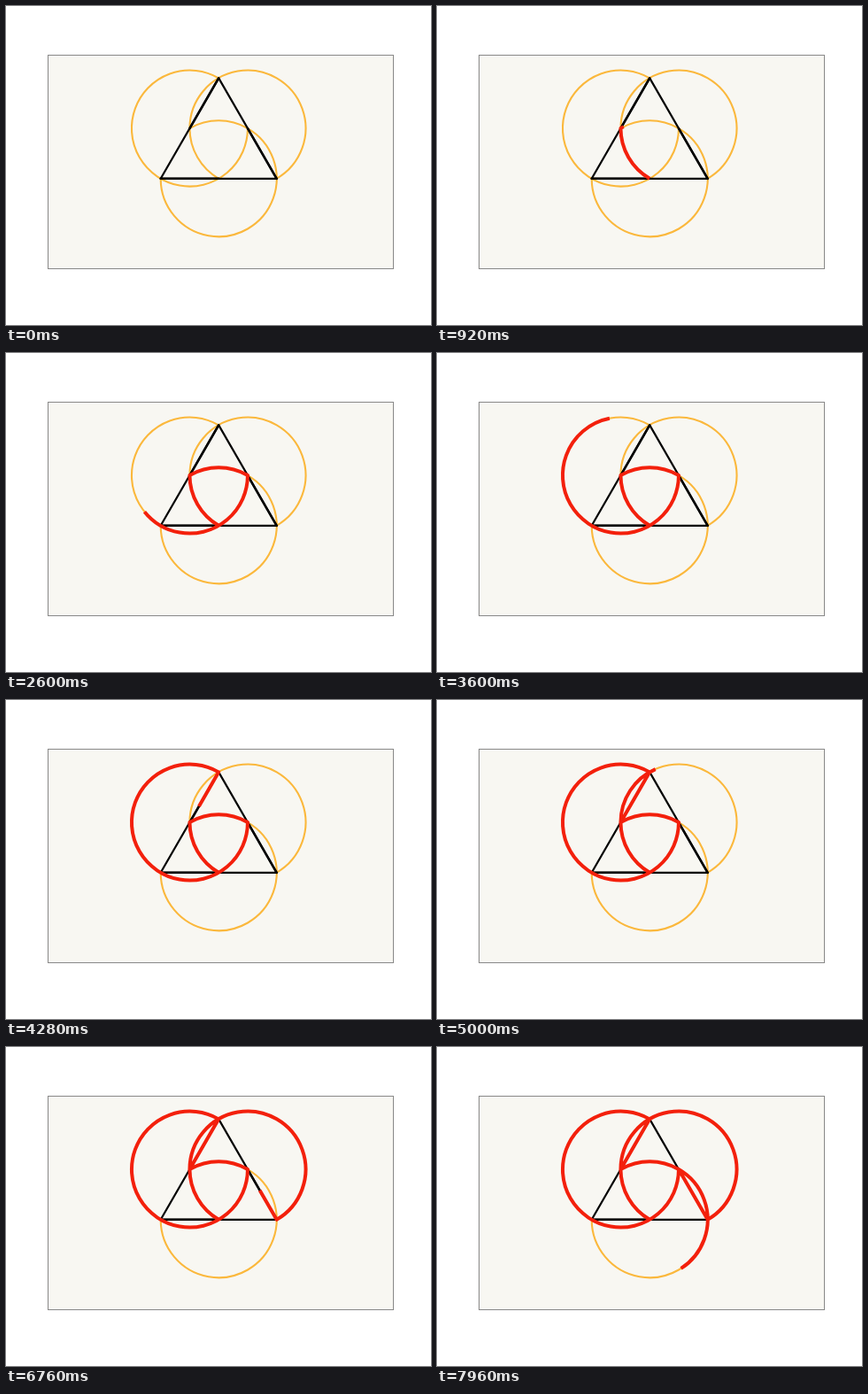
Animation of 480x360 px, one loop 8000 ms. Source, as an HTML page:

```html
<!DOCTYPE html>
<html lang="en">
<head>
<meta charset="utf-8">
<title>Tracing three circles</title>
<style>
  html, body { margin: 0; width: 100%; height: 100%; overflow: hidden; background: #fff; }
  svg { display: block; width: 480px; height: 360px; }
  path { fill: none; stroke-linejoin: round; }
  .panel { fill: #f8f7f2; stroke: #888; stroke-width: 1; }
  .arcs { stroke: #fbb83c; stroke-width: 2.1; }
  .triangle { stroke: #000; stroke-width: 2.2; }
  .halves { stroke: #000; stroke-width: 2.6; stroke-linecap: round; }
  .trace {
    stroke: #f3200c;
    stroke-width: 4;
    stroke-dasharray: 2000 2000;
    animation: trace 8s infinite;
  }
  /* Hidden for 400 ms, then constant speed in 40 ms steps. */
  @keyframes trace {
    0% { stroke-dashoffset: 2000; animation-timing-function: steps(1, end); }
    5% { stroke-dashoffset: 1997.6; animation-timing-function: steps(190, end); }
    100% { stroke-dashoffset: 976.5; }
  }
</style>
</head>
<body>
<svg viewBox="0 0 480 360">
  <rect class="panel" x="47.5" y="55.5" width="390" height="241"/>
  <path class="arcs" d="M240.2 194.8
    A65.5 65.5 0 0 1 207.45 138.08
    A65.5 65.5 0 0 1 272.95 138.08
    A65.5 65.5 0 1 1 240.2 81.36
    M207.45 138.08 A65.5 65.5 0 1 1 305.7 194.8
    M272.95 138.08 A65.5 65.5 0 1 1 174.7 194.8"/>
  <path class="triangle" d="M240.2 81.36 L305.7 194.8 H174.7 Z"/>
  <path class="halves" d="M240.2 81.36 L207.45 138.08 M305.7 194.8 L272.95 138.08 M174.7 194.8 H240.2"/>
  <path class="trace" d="M240.2 194.8
    A65.5 65.5 0 0 1 207.45 138.08
    A65.5 65.5 0 0 1 272.95 138.08
    A65.5 65.5 0 1 1 240.2 81.36
    L207.45 138.08
    A65.5 65.5 0 1 1 305.7 194.8
    L272.95 138.08
    A65.5 65.5 0 1 1 174.7 194.8"/>
</svg>
</body>
</html>
```
